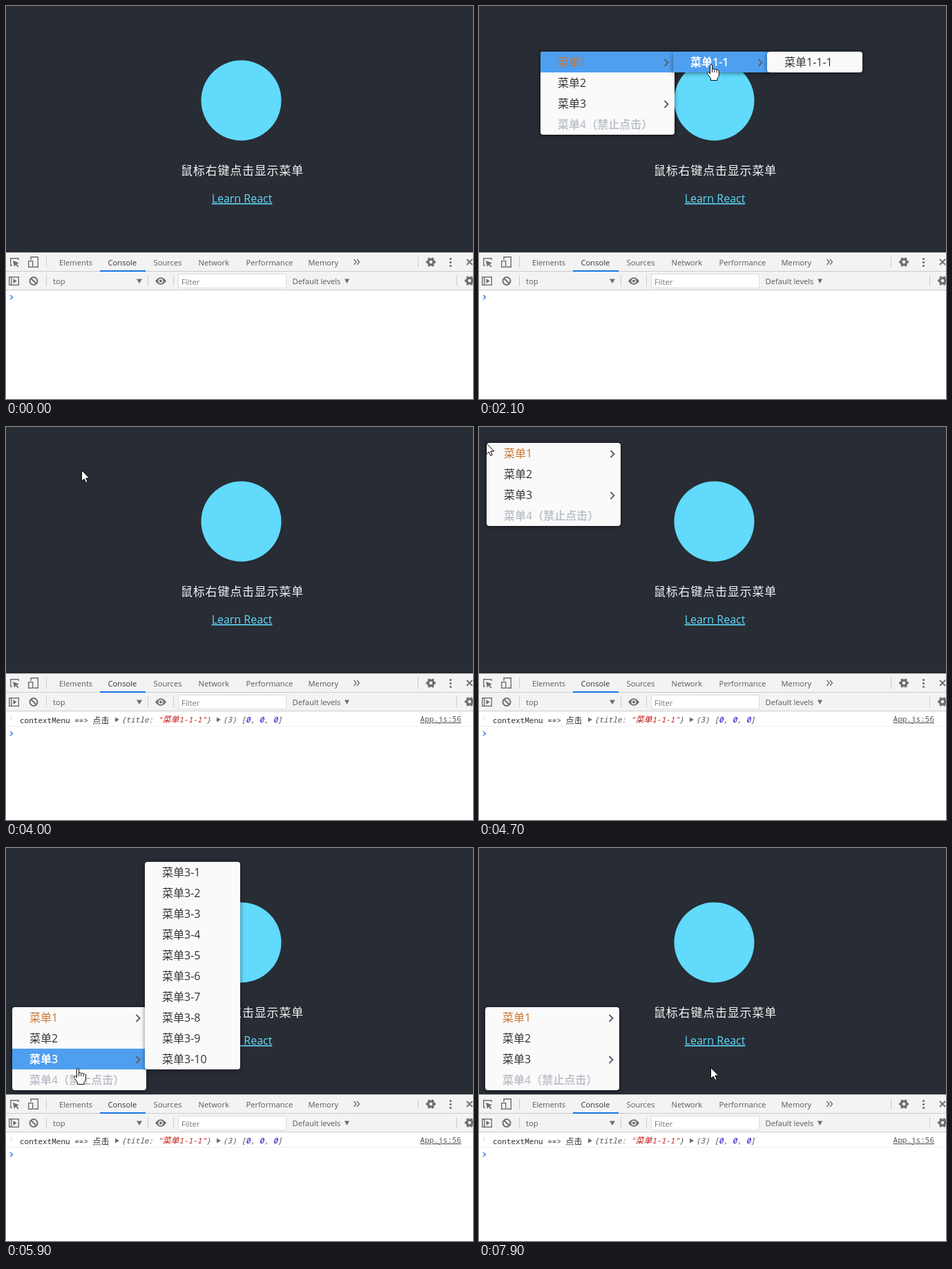
Animation of 676x568 px, one loop 8 s. Source, as an HTML page:

```html
<!DOCTYPE html>
<html lang="zh-CN">
<head>
<meta charset="utf-8">
<title>Context menu</title>
<style>
  html, body { margin: 0; width: 100%; height: 100%; overflow: hidden; background: #fff; }
  svg { display: block; }
  text { white-space: pre; }
  .page, .item { font: 16px "Open Sans", "Noto Sans CJK SC", "Noto Sans CJK", sans-serif; }
  .heading { font: 200 17px "Noto Sans CJK SC", "Noto Sans CJK", sans-serif; letter-spacing: .8px; }
  .ui { font: 11.2px "Open Sans", "Noto Sans", sans-serif; fill: #5a5a5a; }
  .log { font: 11px "Noto Sans Mono", "Liberation Mono", "Noto Sans CJK SC", monospace; fill: #303030; }
  .log .cjk { font-size: 12px; }
  .preview { font-style: italic; fill: #565656; }
  .str { fill: #c41a16; }
  .num { fill: #1c00cf; }
  .panel { filter: drop-shadow(0 1px 3px rgba(0, 0, 0, .5)); }
  .line { fill: none; stroke: #6e6e6e; }
</style>
</head>
<body>
<svg width="676" height="568" viewBox="0 0 676 568">
  <rect width="676" height="356" fill="#282c34"/>
  <circle cx="340.5" cy="136.5" r="58" fill="#61dafb"/>
  <text class="heading" x="342" y="244" text-anchor="middle" fill="#f4f4f4">鼠标右键点击显示菜单</text>
  <text class="page" x="341.5" y="284" text-anchor="middle" fill="#61dafb" text-decoration="underline">Learn React</text>

  <rect y="356" width="676" height="55" fill="#f3f3f3"/>
  <path d="M0 356.5H676M0 383.5H676M0 410.5H676" stroke="#cccccc"/>
  <path d="M58.5 362V378M596.5 362V378M58.5 389V405M205.5 389V405M242.5 389V405M652.5 389V405" stroke="#cccccc"/>
  <rect x="136" y="382" width="66" height="2" fill="#1a73e8"/>
  <g class="ui" id="labels"></g>

  <g class="line" stroke-width="1.4">
    <path d="M9 375H6.700V364.700H18V367"/>
    <path d="M10 368L19 371.500L15.500 373L18.500 376.500L17 377.500L14 374L12 377Z" fill="#6e6e6e" stroke="none"/>
    <path d="M36 367V362.700H46.300V377.300H40"/>
    <rect x="32.700" y="368.700" width="6" height="8.600"/>
    <path d="M503.500 366L507 370L503.500 374M508 366L511.500 370L508 374"/>
    <path d="M667 366L675 374M675 366L667 374" stroke-width="1.800"/>
    <rect x="4.700" y="391.700" width="13.600" height="11.600"/>
    <path d="M7.700 392V403"/>
    <path d="M10.500 394L15.500 397.500L10.500 401Z" fill="#6e6e6e" stroke="none"/>
    <circle cx="40" cy="397.500" r="5.500" stroke-width="2"/>
    <path d="M36 393.500L44 401.500" stroke-width="2"/>
  </g>
  <g fill="#6e6e6e">
    <circle cx="643.5" cy="365.500" r="1.600"/><circle cx="643.5" cy="370.500" r="1.600"/><circle cx="643.5" cy="375.500" r="1.600"/>
    <path d="M216 397.500Q224 387 232 397.500Q224 408 216 397.500Z"/>
    <circle cx="224" cy="397.500" r="2.800" stroke="#f3f3f3" stroke-width="1.500"/>
    <path d="M189 394.500H197L193 401ZM490 394.500H497L493.500 401Z"/>
  </g>
  <g id="gears"></g>
  <rect x="249.5" y="387.500" width="156" height="20" fill="#fff" stroke="#dddddd"/>
  <text class="ui" x="254" y="402.500" style="fill:#777">Filter</text>

  <g id="log" class="log">
    <path d="M6 418L9 421L6 424" fill="none" stroke="#e4e4e4" stroke-width="1.500"/>
    <text x="20" y="428">contextMenu ==&gt; </text>
    <text class="cjk" x="125.500" y="428.500">点击</text>
    <path d="M158 419.500L164 423L158 426.500ZM305 419.500L311 423L305 426.500Z" fill="#6e6e6e"/>
    <g class="preview">
      <text x="167" y="427">{title: <tspan class="str">"<tspan class="cjk">菜单</tspan>1-1-1"</tspan>}</text>
      <text x="314" y="427">(3) [<tspan class="num">0</tspan>, <tspan class="num">0</tspan>, <tspan class="num">0</tspan>]</text>
    </g>
    <text x="659" y="426" text-anchor="end" fill="#545454" text-decoration="underline">App.js:56</text>
    <path d="M0 432.500H676" stroke="#f0f0f0"/>
  </g>
  <path id="prompt" d="M6 418L9.500 421L6 424" fill="none" stroke="#367cf1" stroke-width="1.500"/>

  <g id="menus"></g>
  <g id="cursor" stroke-linejoin="round">
    <path id="arrow" d="M.5 .5V16.500L4.200 13L6.700 18.500L9.200 17.400L6.800 12H11.800Z" fill="#fff" stroke="#000"/>
    <g id="hand">
      <path d="M-2.500 12V2Q-2.500 .5 -1 .5T.5 2V8Q1 6.500 2.300 6.700T3.700 8.500Q4.500 7 5.800 7.400T7 9.300Q8 8 9.200 8.800T10.300 11V16Q10 19 8 20.500V23.500H-1.500V21Q-3 18.500 -6 14.500Q-7.300 12.500 -6 11.700T-2.500 14Z" fill="#fff" stroke="#111"/>
      <path d="M.5 8V12M3.700 9V12M7 10V12.500" stroke="#111"/>
    </g>
  </g>
</svg>
<script>
const LOOP = 8000, STEP = 100, ROW = 30, PAGE_BOTTOM = 356;
const $ = id => document.getElementById(id);

const leaf = title => ({ title });
const rootItems = [
  { title: '菜单1', accent: true, children: [{ title: '菜单1-1', children: [leaf('菜单1-1-1')] }] },
  leaf('菜单2'),
  { title: '菜单3', children: Array.from({ length: 10 }, (_, i) => leaf(`菜单3-${i + 1}`)) },
  { title: '菜单4（禁止点击）', disabled: true }
];

// Each state holds the menu's corner and the chain of highlighted rows.
const states = [
  { from: 0 },
  { from: 800, at: [89, 66], path: [] },
  { from: 1100, at: [89, 66], path: [0] },
  { from: 2000, at: [89, 66], path: [0, 0] },
  { from: 2500, at: [89, 66], path: [0, 0, 0] },
  { from: 2800 },
  { from: 4600, at: [11, 23], path: [] },
  { from: 5300 },
  { from: 5500, at: [9, 230], path: [] },
  { from: 5700, at: [9, 230], path: [2] },
  { from: 6200, at: [9, 230], path: [] }
];

// time, x, y
const route = [
  [100, 620, 150], [700, 88, 66], [1000, 88, 66], [1400, 185, 82], [1800, 160, 80],
  [2100, 337, 84], [2300, 350, 84], [2700, 470, 84], [2800, 470, 84], [3200, 344, 100],
  [3600, 270, 95], [4300, 4, 40], [4500, 10, 23], [4800, 10, 23], [5300, 8, 230],
  [5500, 8, 230], [5900, 105, 318], [6200, 100, 325], [6800, 60, 329], [7200, 40, 327],
  [7500, 140, 322], [7900, 335, 317]
];

function cursorAt(t) {
  const next = route.findIndex(p => p[0] >= t);
  if (next < 1) return route[0].slice(1);
  const [t0, x0, y0] = route[next - 1], [t1, x1, y1] = route[next];
  const u = (t - t0) / (t1 - t0), k = u * u * (3 - 2 * u);
  return [x0 + (x1 - x0) * k, y0 + (y1 - y0) * k];
}

function itemMarkup(item, x, y, width, active) {
  const color = item.accent ? '#c9752d' : item.disabled ? '#c0c4cc' : active ? '#fff' : '#333';
  const weight = (active && !item.accent) || item.disabled ? 600 : 400;
  const right = x + width;
  return (active ? `<rect x="${x}" y="${y}" width="${width}" height="${ROW}" fill="#4e9ff0"/>` : '') +
    `<text class="item" x="${x + 25}" y="${y + 21}" style="fill:${color};font-weight:${weight}">${item.title}</text>` +
    (item.children ? `<path d="M${right - 14.500} ${y + 11}l5 5l-5 5" fill="none" stroke="#606266" stroke-width="2"/>` : '');
}

function menuMarkup(items, x, y, path, depth = 0) {
  const width = depth ? 138 : 194, height = items.length * ROW, id = `clip${depth}`;
  const active = path[depth];
  let markup = `<clipPath id="${id}"><rect x="${x}" y="${y}" width="${width}" height="${height}" rx="4"/></clipPath>
    <rect class="panel" x="${x}" y="${y}" width="${width}" height="${height}" rx="4" fill="#fafafa"/>
    <g clip-path="url(#${id})">` +
    items.map((item, i) => itemMarkup(item, x, y + i * ROW, width, i === active)).join('') + '</g>';
  const children = items[active]?.children;
  if (children) {
    const top = y + active * ROW, size = children.length * ROW;
    const childY = top + size > PAGE_BOTTOM ? top + ROW - size : top;
    markup += menuMarkup(children, x + width - 2, childY, path, depth + 1);
  }
  return markup;
}

function gear(x, y) {
  return `<g fill="none" stroke="#6e6e6e"><circle cx="${x}" cy="${y}" r="3.900" stroke-width="3.200"/>
    <circle cx="${x}" cy="${y}" r="6" stroke-width="2" pathLength="12" stroke-dasharray="1" stroke-dashoffset=".5"/></g>`;
}

$('gears').innerHTML = gear(615, 370) + gear(671, 397);
$('labels').innerHTML = [
  ['Elements', 77, 375], ['Console', 147.5, 375], ['Sources', 213.5, 375], ['Network', 278.5, 375],
  ['Performance', 347.5, 375], ['Memory', 437.5, 375], ['top', 68, 402], ['Default levels', 414.5, 402]
].map(([label, x, y]) =>
  `<text x="${x}" y="${y}"${label === 'Console' ? ' style="fill:#333"' : ''}>${label}</text>`).join('');

const show = (id, on) => $(id).setAttribute('display', on ? 'inline' : 'none');
let shown;

function render(t) {
  const state = states.findLast(s => s.from <= t);
  if (state !== shown) {
    $('menus').innerHTML = state.at ? menuMarkup(rootItems, ...state.at, state.path) : '';
    shown = state;
  }
  const logged = t >= 2800;
  show('log', logged);
  $('prompt').setAttribute('transform', `translate(0 ${logged ? 22 : 0})`);

  const [x, y] = cursorAt(t), pointing = Boolean(state.path?.length);
  show('cursor', t >= route[0][0]);
  show('hand', pointing);
  show('arrow', !pointing);
  $('cursor').setAttribute('transform', `translate(${Math.round(x)} ${Math.round(y)})`);
}

const start = performance.now();
function tick() {
  const t = (performance.now() - start) % LOOP;
  render(Math.floor(t / STEP) * STEP);
  requestAnimationFrame(tick);
}
tick();
</script>
</body>
</html>
```
